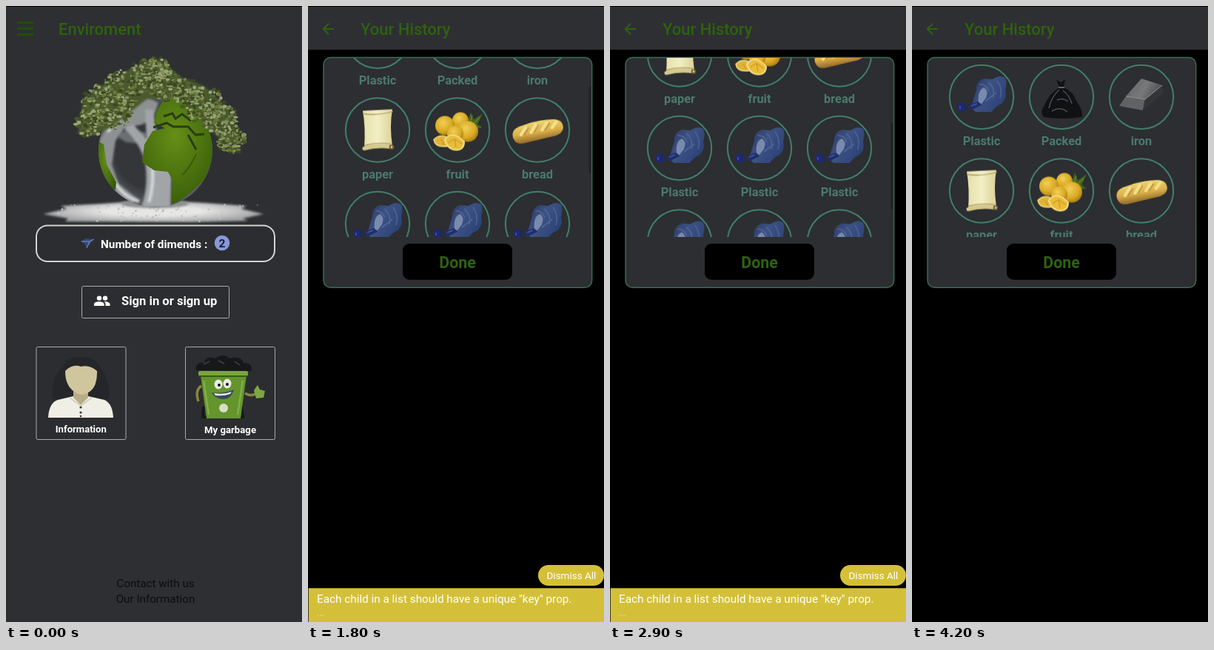
Recreate the animation shown at these times as an HTML page. Size 400 by 832 pixels, loop 4.4 s.

```html
<!DOCTYPE html>
<html lang="en">
<head>
<meta charset="utf-8">
<title>Environment app</title>
<style>
@property --s { syntax: '<number>'; inherits: true; initial-value: 0; }
html, body { margin: 0; width: 100%; height: 100%; overflow: hidden; background: #000; }
svg { display: block; width: 100vw; height: 100vh; }
text { font-family: Roboto, sans-serif; }
.bold { font-weight: 700; }
.title { font-size: 22px; font-weight: 500; fill: #2f620f; }
.done { font-size: 21.4px; font-weight: 700; fill: #2f620f; }
.mid { text-anchor: middle; }
.white { fill: #fff; }
.label { font-size: 16.4px; font-weight: 700; fill: #4b7a6b; text-anchor: middle; }
.ring { fill: none; stroke: #427f69; stroke-width: 2; }
.frame { fill: #2c2d30; stroke: #a9aaac; }

/* one step of 100 ms is 2.27 % of the loop */
#home, #garbage, #history, #head, #card, .pic, #list, #thumb, #low, #high, #toast {
  animation: 4.4s step-end infinite;
}
#home { animation-name: home; }
#garbage { animation-name: press; }
#history { animation-name: history; }
#head { animation-name: head; }
#card { animation-name: card; transform-origin: 202.4px 224.8px; }
.pic { animation-name: load; }
#list { animation-name: scroll; }
#rows { transform: translateY(calc(var(--s) * -1px)); }
#bar { transform: translateY(calc(var(--s) * .479px)); }
#thumb { animation-name: thumb; }
#low { animation-name: low; transform-origin: 202px 312px; }
#high { animation-name: high; transform-origin: 202px 70px; }
#toast { animation-name: toast; }

@keyframes home { 0% { visibility: visible } 6.81%, 100% { visibility: hidden } }
@keyframes history { 0% { visibility: hidden } 6.81%, 100% { visibility: visible } }
@keyframes press { 0% { opacity: 1 } 2.27% { opacity: .6 } 4.54%, 100% { opacity: .35 } }
@keyframes head {
  0% { transform: translateX(280px); opacity: .3 }
  9.09% { transform: translateX(118.5px); opacity: .62 }
  29.54% { transform: translateX(7.5px); opacity: .97 }
  31.81% { transform: translateX(1.5px); opacity: 1 }
  34.09%, 100% { transform: none; opacity: 1 }
}
@keyframes card {
  0% { transform: scale(.92); opacity: .2 }
  9.09% { transform: scale(.95); opacity: .55 }
  29.54% { transform: scale(.983); opacity: .95 }
  31.81% { transform: scale(.995); opacity: 1 }
  34.09%, 100% { transform: none; opacity: 1 }
}
@keyframes load { 0% { opacity: 0 } 34.09% { opacity: .6 } 36.36%, 100% { opacity: 1 } }
@keyframes scroll {
  0% { --s: 0 } 38.63% { --s: 22 } 40.9% { --s: 82 } 43.18% { --s: 160 }
  45.45% { --s: 226 } 47.72% { --s: 264 }
  63.63% { --s: 236 } 65.9% { --s: 184 } 68.18% { --s: 128 } 70.45% { --s: 76 }
  72.72% { --s: 36 } 75% { --s: 10 } 77.27% { --s: -1 } 81.81%, 100% { --s: 0 }
}
@keyframes thumb { 0% { opacity: 1 } 84.09% { opacity: .5 } 86.36%, 100% { opacity: 0 } }
@keyframes low {
  0% { transform: scaleY(0) } 47.72% { transform: scaleY(.5) } 50% { transform: none }
  52.27% { transform: scaleY(.7) } 54.54% { transform: scaleY(.3) } 56.81%, 100% { transform: scaleY(0) }
}
@keyframes high {
  0% { transform: scaleY(0) } 75% { transform: scaleY(.5) } 77.27% { transform: none }
  79.54% { transform: scaleY(.6) } 81.81%, 100% { transform: scaleY(0) }
}
@keyframes toast { 0% { visibility: hidden } 9.09% { visibility: visible } 88.63%, 100% { visibility: hidden } }
</style>
</head>
<body>
<svg viewBox="0 0 400 832">
  <defs>
    <clipPath id="view"><rect x="22" y="70" width="361" height="242"/></clipPath>
    <clipPath id="ball"><circle cx="202" cy="195" r="77"/></clipPath>
    <filter id="soft" x="-10%" y="-30%" width="120%" height="160%"><feGaussianBlur stdDeviation="1.6"/></filter>
    <radialGradient id="land" cx=".45" cy=".35" r=".75">
      <stop offset="0" stop-color="#658f16"/><stop offset="1" stop-color="#345908"/>
    </radialGradient>
    <radialGradient id="glass"><stop offset=".7" stop-color="#34363a"/><stop offset="1" stop-color="#5c5f60"/></radialGradient>
    <radialGradient id="snow"><stop offset=".45" stop-color="#e6e6e5"/><stop offset="1" stop-color="#a5a6a6"/></radialGradient>
    <linearGradient id="bag" x2="1" y2=".6">
      <stop offset="0" stop-color="#26355f"/><stop offset=".5" stop-color="#3d5284"/><stop offset="1" stop-color="#2c4277"/>
    </linearGradient>
    <linearGradient id="metal" x2="1" y2=".3">
      <stop offset="0" stop-color="#606264"/><stop offset=".6" stop-color="#77797b"/><stop offset="1" stop-color="#505254"/>
    </linearGradient>
    <radialGradient id="orange" cx=".4" cy=".35" r=".75">
      <stop offset="0" stop-color="#f2cf55"/><stop offset=".6" stop-color="#d9a924"/><stop offset="1" stop-color="#96700f"/>
    </radialGradient>
    <linearGradient id="crust" x2="0" y2="1">
      <stop offset="0" stop-color="#ecd571"/><stop offset=".55" stop-color="#d9b04a"/><stop offset="1" stop-color="#92682a"/>
    </linearGradient>
    <linearGradient id="sheet"><stop offset="0" stop-color="#e6dfa9"/><stop offset=".5" stop-color="#f3efc5"/><stop offset="1" stop-color="#dcd398"/></linearGradient>

    <g id="plastic">
      <path d="M-7-10Q-8-21 3-25L15-24Q25-31 32-26Q35-20 32-9Q35 2 27 9Q17 14 14 20H-8L-14 14Z" fill="url(#bag)"/>
      <path d="M-4 7Q-6-9 3-13Q10-9 6 1L0 9Z" fill="#8d9dbd" opacity=".75"/>
      <path d="M9-20Q19-12 16 1M21-22Q29-12 25 2M-3-17Q6-18 10-8M6 5L20-6" fill="none" stroke="#7488b1" stroke-width="1.6" opacity=".4"/>
      <path d="M-18 11L-5 6 0 11-15 18Z" fill="#222e69"/>
      <rect x="-32" y="8" width="11" height="11" rx="4" fill="#1d2873"/>
      <path d="M-29 12v4M-14 12l8-3" stroke="#4356a5" stroke-width="1.6"/>
    </g>
    <g id="packed">
      <path d="M-3-13L-7-23 0-20 5-24 3-13Q16-7 20 5Q31 21 27 27Q0 31-24 27Q-30 22-23 11Q-17-4-3-13Z" fill="#101113"/>
      <path d="M-3-10Q-14 0-17 15M2-9Q11-2 14 9M-6 4Q2 0 9 6M-13 19Q-2 12 8 20" fill="none" stroke="#4a4d51" stroke-width="1.5"/>
      <path d="M-4-13H4" stroke="#5f6265" stroke-width="2"/>
    </g>
    <g id="iron">
      <path d="M-21-1L0-25 28-16 5 3Z" fill="url(#metal)"/>
      <path d="M-21-1L5 3 2 18-30 12Z" fill="#606264"/>
      <path d="M5 3L28-16 30-6 2 18Z" fill="#333537"/>
      <path d="M-21-1L5 3 28-16" fill="none" stroke="#929496"/>
    </g>
    <g id="paper">
      <path d="M-20-26L20-28Q16-6 20 22L-18 25Q-16-4-20-26Z" fill="url(#sheet)"/>
      <path d="M-20-22Q0-19 21-25M-18 21Q0 16 18 19" fill="none" stroke="#aa9c61" stroke-width="1.3"/>
      <path d="M-18 25Q0 20 19 23" fill="none" stroke="#d4c98d" stroke-width="5" stroke-linecap="round"/>
      <circle cx="19" cy="23" r="3.3" fill="#715f33"/><circle cx="19" cy="23" r="1.4" fill="#ddd094"/>
    </g>
    <g id="fruit">
      <path d="M13-9L18-24 22-14 34-22 27-8 34-3 22-2Z" fill="#46671d"/>
      <path d="M16-7L20-20M20-7L30-17" stroke="#748d35"/>
      <circle cx="4" cy="-13" r="11" fill="url(#orange)"/><circle cx="-17" cy="-6" r="13" fill="url(#orange)"/>
      <circle cx="14" cy="2" r="14" fill="url(#orange)"/><circle cx="-3" cy="5" r="11" fill="url(#orange)"/>
      <path d="M-32 13Q-24 5-13 10L-14 22Q-30 24-32 13Z" fill="#dfb336" stroke="#f4dc83" stroke-width="1.5"/>
      <path d="M-17 13Q-7-1 9 16Q9 27-2 27Q-14 26-17 13Z" fill="#e8bd38" stroke="#f4dc83" stroke-width="2"/>
      <path d="M-4 12L-12 17M-4 12L-2 23M-4 12L6 19M-22 13L-18 20" stroke="#c98e20"/>
    </g>
    <g id="bread" transform="rotate(-9)">
      <path d="M-34 6Q-36-7-20-9Q0-14 23-11Q36-9 35 2Q33 12 16 12L-22 15Q-32 15-34 6Z" fill="url(#crust)"/>
      <path d="M-23 3L-15-6M-9 2L-1-8M6 1L14-8M20 0L27-7" stroke="#f4e08b" stroke-width="4" stroke-linecap="round"/>
      <path d="M-19 4L-11-5M-5 3L3-7M10 2L18-7" stroke="#b5843a" stroke-width="1.2"/>
    </g>
  </defs>

  <g id="home">
    <rect y="1" width="400" height="831" fill="#2e2f32"/>
    <path d="M15 22.5H37M15 30.5H37M15 38.5H37" stroke="#204d0a" stroke-width="3.6"/>
    <text class="title" x="71" y="39">Enviroment</text>

    <path d="M50 281L82 274 74 270 130 267 200 262 270 266 325 270 318 274 348 281 320 287 327 290 250 292 80 291 84 287Z" fill="url(#snow)" filter="url(#soft)"/>
    <g id="dust" fill="#bfc0c0"></g>
    <ellipse cx="201" cy="267" rx="46" ry="6" fill="#8b8d8f" filter="url(#soft)"/>
    <g clip-path="url(#ball)">
      <circle cx="202" cy="195" r="77" fill="url(#glass)"/>
      <g filter="url(#soft)">
        <path d="M125 185L140 155 160 135 190 122 206 131 199 152 184 160 160 165 148 182 143 214 152 240 180 262 160 272 125 230Z" fill="#8d9192"/>
        <path d="M150 176L166 164 190 172 186 186 162 184Z" fill="#6b6e71"/>
        <path d="M183 272Q193 241 188 212Q183 188 160 165L172 160 190 180 188 140H199L205 182Q207 214 224 226L222 272Z" fill="#a2a5a8"/>
        <path d="M193 265Q203 232 194 196M146 236Q157 257 180 264M138 170Q146 150 170 139" fill="none" stroke="#d6d8d9" stroke-width="4"/>
      </g>
      <path d="M124 182L132 187 136 214 149 238 148 248 138 245 124 215Z" fill="url(#land)"/>
      <path d="M204 141L214 125 248 124 276 157 282 198 268 235 237 262 223 268 225 236 219 224 200 222 184 211 187 187 198 169 215 165 200 158Z" fill="url(#land)"/>
      <path d="M199 164L217 158 226 163 246 163 256 174 268 173M246 174L257 194M213 149L225 145 229 152 238 146 250 155" fill="none" stroke="#2b3c15" stroke-width="3"/>
      <path d="M257 200Q248 220 238 228" fill="none" stroke="#355b0c" stroke-width="2"/>
    </g>
    <path d="M97 172L104 128 142 98 183 78 205 71 236 96 268 108 300 138 311 165 317 199 298 190 276 165 252 132 224 124 190 126 165 146 140 165 108 177Z" fill="#4c5a2d" filter="url(#soft)"/>
    <g id="leaves"></g>

    <rect x="41" y="296.5" width="322" height="48.5" rx="15" fill="#2c2d30" stroke="#d3d4d4" stroke-width="2"/>
    <path d="M101 318L108 314 119 315 115 320 109 327 106 321Z" fill="#33477c"/>
    <path d="M102 318L113 318 119 315M109 327L113 318" fill="none" stroke="#8796b9"/>
    <text class="bold white" x="128" y="326.5" font-size="15.3">Number of dimends :</text>
    <circle cx="292" cy="320" r="10.3" fill="#8799d9"/>
    <text class="bold mid" x="292" y="325.5" font-size="15.5" fill="#171c35">2</text>

    <rect class="frame" x="102.5" y="378.5" width="199" height="43" rx="2"/>
    <g class="white">
      <circle cx="126" cy="394.6" r="3.2"/><circle cx="134" cy="394.6" r="3.2"/>
      <path d="M119 405v-2.4c0-4.6 13.6-4.6 13.6 0v2.4zM134.5 405v-2.4q0-2-1.9-3.4c4-.3 7.9 1 7.9 3.4v2.4z"/>
    </g>
    <text class="bold white" x="156" y="404" font-size="16.6">Sign in or sign up</text>

    <rect class="frame" x="41" y="460.5" width="121" height="125" rx="2"/>
    <path d="M63 531Q60 505 75 489Q81 473 101 474Q121 473 128 489Q142 507 139 531Z" fill="#252629"/>
    <path d="M57 556Q58 536 70 532L91 527H111L133 532Q144 537 145 556Z" fill="#f0efe5"/>
    <path d="M91 514H111V529L101 539 91 529Z" fill="#b8ae86"/>
    <path d="M80 493Q90 483 101 487Q113 484 123 493Q124 522 102 525Q80 520 80 493Z" fill="#cfc69d"/>
    <path d="M86 529L101 540 116 529" fill="none" stroke="#d3d1c3" stroke-width="2"/>
    <g fill="#37383a"><circle cx="101" cy="542" r="1.6"/><circle cx="101" cy="549" r="1.6"/><circle cx="101" cy="554" r="1.3"/></g>
    <text class="bold white mid" x="101.3" y="576" font-size="13.1">Information</text>

    <g id="garbage">
      <rect class="frame" x="242.5" y="460.5" width="121" height="125" rx="2"/>
      <path d="M257 492Q255 480 268 482Q269 472 283 476Q294 468 302 476Q318 472 321 482Q335 483 331 493Z" fill="#17181a"/>
      <path d="M267 484l8-4M287 479l8 4M309 480l7 5" stroke="#36393c" stroke-width="2"/>
      <path d="M264 513Q255 519 260 534M323 523Q331 528 339 523" fill="none" stroke="#86873a" stroke-width="3.5"/>
      <path d="M335 519L340 512 343 518 350 520 348 529 338 530Z" fill="#7fa645"/>
      <path d="M267 541L266 555H274M318 541L320 555H312" fill="none" stroke="#17181a" stroke-width="4"/>
      <path d="M263 499H325L317 557H271Z" fill="#64952d"/>
      <path d="M267 506L274 552M320 506L313 552" stroke="#82ad48" stroke-width="2.5"/>
      <rect x="260" y="493" width="67" height="7" rx="2" fill="#7ba540"/>
      <path d="M261 500H326" stroke="#37591a" stroke-width="2"/>
      <g fill="#e9eae4"><ellipse cx="287" cy="511" rx="5.5" ry="6.5"/><ellipse cx="299" cy="510" rx="5.5" ry="6.5"/></g>
      <circle cx="288" cy="512" r="1.9"/><circle cx="299" cy="511" r="1.9"/>
      <path d="M278 522Q294 524 308 518Q304 532 292 531Q282 530 278 522Z" fill="#394a58"/>
      <path d="M281 523Q295 525 305 521L303 524Q295 527 283 526Z" fill="#e9eae4"/>
      <circle cx="294" cy="543" r="6" fill="#d5dfc3"/>
      <text class="bold white mid" x="303" y="577" font-size="13.2">My garbage</text>
    </g>

    <g class="mid" font-size="15.2" fill="#0d0d0e">
      <text x="202" y="784.5">Contact with us</text>
      <text x="202" y="805.5">Our Information</text>
    </g>
  </g>

  <g id="history">
    <rect width="400" height="832"/>
    <g id="head">
      <rect y="1" width="400" height="58" fill="#2e2f32"/>
      <path d="M35 31H21M28 23.7L20.7 31 28 38.3" fill="none" stroke="#2f620f" stroke-width="2"/>
      <text class="title" x="71" y="39">Your History</text>
    </g>
    <g id="card">
      <rect x="21" y="69.5" width="362.7" height="310.7" rx="9.5" fill="#2c2e31" stroke="#3a6b57" stroke-width="1.5"/>
      <g id="list" clip-path="url(#view)">
        <g id="rows"></g>
        <g id="thumb"><rect id="bar" x="379" y="70" width="3.5" height="116" fill="#222426"/></g>
        <path id="low" d="M22 312V303Q202 277 383 303V312Z" fill="#fff" opacity=".1"/>
        <path id="high" d="M22 70V81Q202 111 383 81V70Z" fill="#fff" opacity=".1"/>
      </g>
      <rect x="128" y="321" width="148" height="48.7" rx="9"/>
      <text class="done mid" x="202" y="353.5">Done</text>
    </g>
  </g>

  <g id="toast">
    <rect x="311" y="755" width="89" height="28" rx="14" fill="#d4c038"/>
    <text class="white" x="322.5" y="773.5" font-size="13.5">Dismiss All</text>
    <rect x=".7" y="786.3" width="399.3" height="45.7" fill="#d4c038"/>
    <text class="white" x="12" y="806" font-size="15.3">Each child in a list should have a unique "key" prop.</text>
    <text class="white" x="12" y="824" font-size="13" opacity=".6">...</text>
  </g>
</svg>
<script>
const byId = id => document.getElementById(id);

let seed = 7;
const rand = () => (seed = seed * 16807 % 2147483647) / 2147483647;

const items = ['Plastic', 'Packed', 'iron', 'paper', 'fruit', 'bread', ...Array(6).fill('Plastic')];
byId('rows').innerHTML = items.map((name, i) => {
  const x = 94 + i % 3 * 108;
  const y = 123 + Math.floor(i / 3) * 126.5;
  return `<g transform="translate(${x} ${y})"><use class="pic" href="#${name.toLowerCase()}"/>
    <circle class="ring" r="43.2"/><text class="label" y="65">${name}</text></g>`;
}).join('');

// Leaf clumps: x, y, radius
const clumps = [
  [113, 158, 19], [127, 131, 25], [157, 113, 27], [188, 97, 25], [204, 88, 19],
  [219, 108, 21], [245, 118, 20], [270, 135, 26], [289, 152, 23], [304, 180, 19], [148, 143, 22]
];
const greens = ['#3b4720', '#52632f', '#69783c', '#83905a', '#9aa577', '#46562b'];
const leaf = ([cx, cy, r]) => {
  const angle = rand() * 2 * Math.PI;
  const reach = r * Math.sqrt(rand());
  const x = cx + reach * Math.cos(angle);
  const y = cy + reach * Math.sin(angle);
  const color = greens[Math.floor(rand() * greens.length)];
  return `<ellipse cx="${x}" cy="${y}" rx="${1.2 + rand() * 2.4}" ry="${1 + rand() * 1.6}" fill="${color}"/>`;
};
byId('leaves').innerHTML = Array.from({ length: 1300 }, (_, i) => leaf(clumps[i % clumps.length])).join('');

byId('dust').innerHTML = Array.from({ length: 110 }, () => {
  const x = 198 + (rand() + rand() - 1) * 150;
  return `<circle cx="${x}" cy="${268 + rand() * 23}" r="${.4 + rand() * 1.1}"/>`;
}).join('');
</script>
</body>
</html>
```
